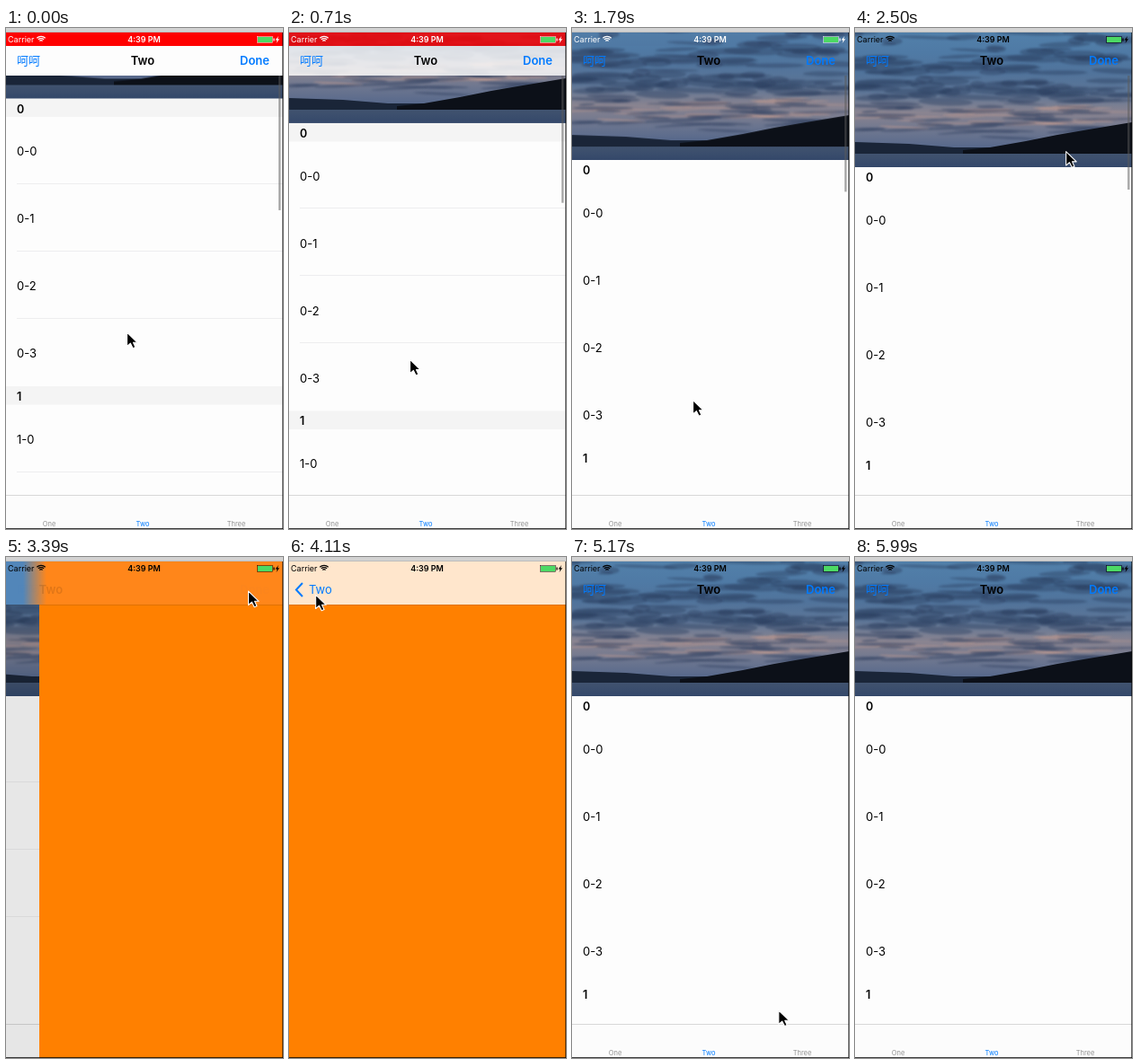
Animation of 308 by 558 pixels, one loop 6090 ms. Source, as an HTML page with a canvas:

```html
<!DOCTYPE html>
<html lang="en">
<head>
<meta charset="utf-8">
<title>Fading navigation bar</title>
<style>
  html, body { margin: 0; width: 100%; height: 100%; overflow: hidden; background: #fdfdfd; }
  canvas { display: block; width: 308px; height: 558px; }
</style>
</head>
<body>
<canvas id="stage" width="308" height="558"></canvas>
<script>
const W = 308, H = 558, LOOP = 6090, TICK = 178.2;
const TOP = 5, NAV_BOTTOM = 53, TAB_TOP = 520;
const PHOTO_H = 150, REST = TOP + PHOTO_H, START = 78.5;
const HEADER_H = 20.5, ROW_H = 75;
const PUSH = 3166, POP = 4130;
const BLUE = '#007aff', ORANGE = '#ff8000';
const SANS = 'Inter, "Noto Sans CJK SC", sans-serif';
const ctx = document.getElementById('stage').getContext('2d');

const ramp = (a, b, v) => Math.max(0, Math.min(1, (v - a) / (b - a)));
const smooth = (a, b, v) => { const u = ramp(a, b, v); return u * u * (3 - 2 * u); };
const easeOut = (a, b, v) => Math.sin(ramp(a, b, v) * Math.PI / 2);

function spring(elapsed) {
  const u = Math.max(0, elapsed) / 60;
  const p = 1 - (1 + u) * Math.exp(-u);
  return p > .995 ? 1 : p;
}

function rect(x, y, w, h, color) {
  ctx.fillStyle = color;
  ctx.fillRect(x, y, w, h);
}

function text(str, x, y, size, color, weight = 400, align = 'left') {
  ctx.font = `${weight} ${size}px ${SANS}`;
  ctx.textAlign = align;
  ctx.fillStyle = color;
  ctx.fillText(str, x, y + size * .36);
}

function polygon(c, points, color) {
  c.beginPath();
  points.forEach(([x, y]) => c.lineTo(x, y));
  c.closePath();
  c.fillStyle = color;
  c.fill();
}

function gradient(c, x1, y1, x2, y2, colors) {
  const g = c.createLinearGradient(x1, y1, x2, y2);
  colors.forEach((color, i) => g.addColorStop(i / (colors.length - 1), color));
  return g;
}

// Dusk sky over a lake, built once.
function makePhoto() {
  const photo = document.createElement('canvas');
  photo.width = W;
  photo.height = PHOTO_H;
  const c = photo.getContext('2d');
  c.fillStyle = gradient(c, 0, 0, 0, 134,
    ['#5280aa', '#4f7aa5', '#50739b', '#5d7596', '#8a8490', '#6b758f', '#50648a']);
  c.fillRect(0, 0, W, PHOTO_H);

  let seed = 11;
  const random = () => (seed = (seed * 16807) % 2147483647) / 2147483647;
  function clouds(count, top, bottom, thickness, color) {
    c.fillStyle = color;
    for (let i = 0; i < count; i++) {
      c.beginPath();
      c.ellipse(random() * W, top + random() * (bottom - top), 8 + random() * 32,
        thickness * (.5 + random()), (random() - .5) * .12, 0, 7);
      c.fill();
    }
  }
  c.filter = 'blur(1px)';
  clouds(75, 0, 78, 3, 'rgba(42,60,92,.4)');
  clouds(22, 52, 72, 3, 'rgba(42,60,92,.4)');
  clouds(26, 80, 106, 1, 'rgba(205,160,145,.45)');
  clouds(45, 74, 122, 1.5, 'rgba(50,66,98,.5)');
  c.filter = 'none';

  polygon(c, [[0, 122], [60, 124], [110, 128], [180, 128], [180, 136], [0, 136]], '#1a2538');
  polygon(c, [[120, 131], [150, 128], [190, 121], [225, 114], [260, 108], [308, 100],
    [308, 136], [120, 136]], '#0c1018');
  c.fillStyle = gradient(c, 0, 135, 0, PHOTO_H, ['#41536f', '#34486a']);
  c.fillRect(0, 135, W, 15);
  return photo;
}
const photo = makePhoto();

function drawList(top, showHeaders, showLines) {
  rect(0, TOP, W, H, '#fdfdfd');
  ctx.drawImage(photo, 0, top - PHOTO_H);
  for (let section = 0, y = top; section < 2; section++) {
    if (showHeaders) rect(0, y, W, HEADER_H, '#f4f4f4');
    text(String(section), 12, y + 11.5, 12.5, '#000', 600);
    y += HEADER_H;
    for (let row = 0; row < 4; row++, y += ROW_H) {
      text(`${section}-${row}`, 12, y + 38.5, 13, '#000');
      if (showLines && row < 3) rect(12, Math.round(y + ROW_H) - 1, W - 12, 1, '#ededef');
    }
  }
}

function drawTabs() {
  rect(0, TAB_TOP, W, H - TAB_TOP, '#fcfcfc');
  rect(0, TAB_TOP, W, 1, '#d8d8d8');
  ['One', 'Two', 'Three'].forEach((label, i) =>
    text(label, 48 + 104 * i, 552, 7.5, i === 1 ? BLUE : '#929292', 400, 'center'));
}

function drawStatus(color) {
  text('Carrier', 2, 13, 9, color);
  text('4:39 PM', 153.5, 13, 9, color, 600, 'center');
  ctx.strokeStyle = color;
  ctx.lineWidth = 1.3;
  for (let r = 2.2; r < 7; r += 2.2) {
    ctx.beginPath();
    ctx.arc(39, 16, r, -Math.PI * .75, -Math.PI * .25);
    ctx.stroke();
  }
  ctx.lineWidth = .5;
  ctx.strokeRect(279.4, 9.4, 17.2, 7.2);
  rect(280, 10, 16, 6, '#4cd964');
  rect(297.4, 11.5, 1.2, 3, color);
  polygon(ctx, [[303, 9], [299.5, 13.5], [301.5, 13.5], [300.5, 17], [304, 12.3], [302, 12.3]], color);
}

function drawPointer(x, y) {
  ctx.save();
  ctx.translate(x, y);
  ctx.scale(1.1, 1.1);
  ctx.lineJoin = 'round';
  polygon(ctx, [[.5, 1], [.5, 15], [4, 12], [6.5, 17], [9, 16], [6.8, 11.2], [11, 11.2]], '#000');
  ctx.strokeStyle = '#fff';
  ctx.lineWidth = 1;
  ctx.stroke();
  ctx.restore();
}

// Drags the list, then visits Done and Back, then leaves the stage.
function pointerAt(t, top) {
  const toDone = easeOut(2080, 2860, t);
  const toBack = easeOut(3570, 4110, t);
  const away = easeOut(4460, 5520, t);
  const y = 338 + (top - START) * 1.1;
  return [
    134 + 135 * toDone - 240 * toBack + 231 * away,
    y + (37 - y) * toDone + 4 * toBack + 534 * away
  ];
}

function drawNavItems(alpha, pushed) {
  ctx.globalAlpha = alpha * alpha;
  text('呵呵', 12, 36.5, 13, BLUE);
  text('Done', 293, 36.5, 13, BLUE, 600, 'right');
  ctx.globalAlpha = alpha;
  text('Two', 152 - 116 * pushed, 36.5, 13, '#000', 600, 'center');
  ctx.globalAlpha = 1;
  if (pushed > .95) {
    ctx.strokeStyle = BLUE;
    ctx.lineWidth = 2;
    ctx.beginPath();
    ctx.moveTo(15, 29);
    ctx.lineTo(8, 36.5);
    ctx.lineTo(15, 44);
    ctx.stroke();
    text('Two', 22, 36.5, 13, BLUE);
  }
}

function drawPushedPage(pushed) {
  const edge = Math.round(W * (1 - pushed));
  rect(0, TOP, edge, H, `rgba(0,0,0,${.1 * pushed})`);
  rect(edge, TOP, W, H, ORANGE);
  if (pushed > .5 && pushed < 1) {
    rect(0, TOP, W, NAV_BOTTOM - TOP,
      gradient(ctx, edge - 18, 0, edge + 8, 0, ['#4a80b6', '#ff8010']));
  }
  rect(0, NAV_BOTTOM, W, 1, 'rgba(0,0,0,.12)');
}

function draw(t) {
  const top = Math.min(REST, START + t * .0385);
  const offset = REST - top;
  const pushed = t < POP ? spring(t - PUSH) : 1 - spring(t - POP);
  const solid = smooth(5, 65, offset);
  const white = .8 * smooth(3350, 3600, t) * (1 - smooth(4450, 4750, t));
  const itemAlpha = t < POP ? 1 - pushed : ramp(POP, POP + 500, t);

  ctx.save();
  ctx.translate(-.3 * W * pushed, 0);
  drawList(top, offset > 40, offset > 40 || pushed > .1);
  drawTabs();
  ctx.restore();

  if (t < 2680) rect(303, NAV_BOTTOM, 2.5, 127 + offset * .3, 'rgba(90,90,90,.5)');
  if (pushed > 0) drawPushedPage(pushed);

  rect(0, TOP, W, NAV_BOTTOM - TOP, `rgba(255,255,255,${white})`);
  rect(0, TOP, W, 15, `rgba(255,0,0,${solid})`);
  rect(0, 20, W, NAV_BOTTOM - 20, `rgba(253,253,253,${solid})`);
  drawNavItems(itemAlpha, pushed);
  drawStatus(offset > 0 ? '#fff' : '#000');

  // Window edges
  rect(0, 0, W, TOP, '#d2d2d2');
  rect(0, TOP - 1, W, 1, '#bdbdbd');
  rect(W - 1, TOP, 1, H, 'rgba(0,0,0,.6)');
  rect(0, H - 1, W, 1, 'rgba(0,0,0,.75)');

  drawPointer(...pointerAt(t, top));
}

// The picture moves in even ticks rather than continuously.
function frame(now) {
  const t = now % LOOP;
  draw(Math.floor((t + 5) / TICK) * TICK);
  requestAnimationFrame(frame);
}
requestAnimationFrame(frame);
</script>
</body>
</html>
```
